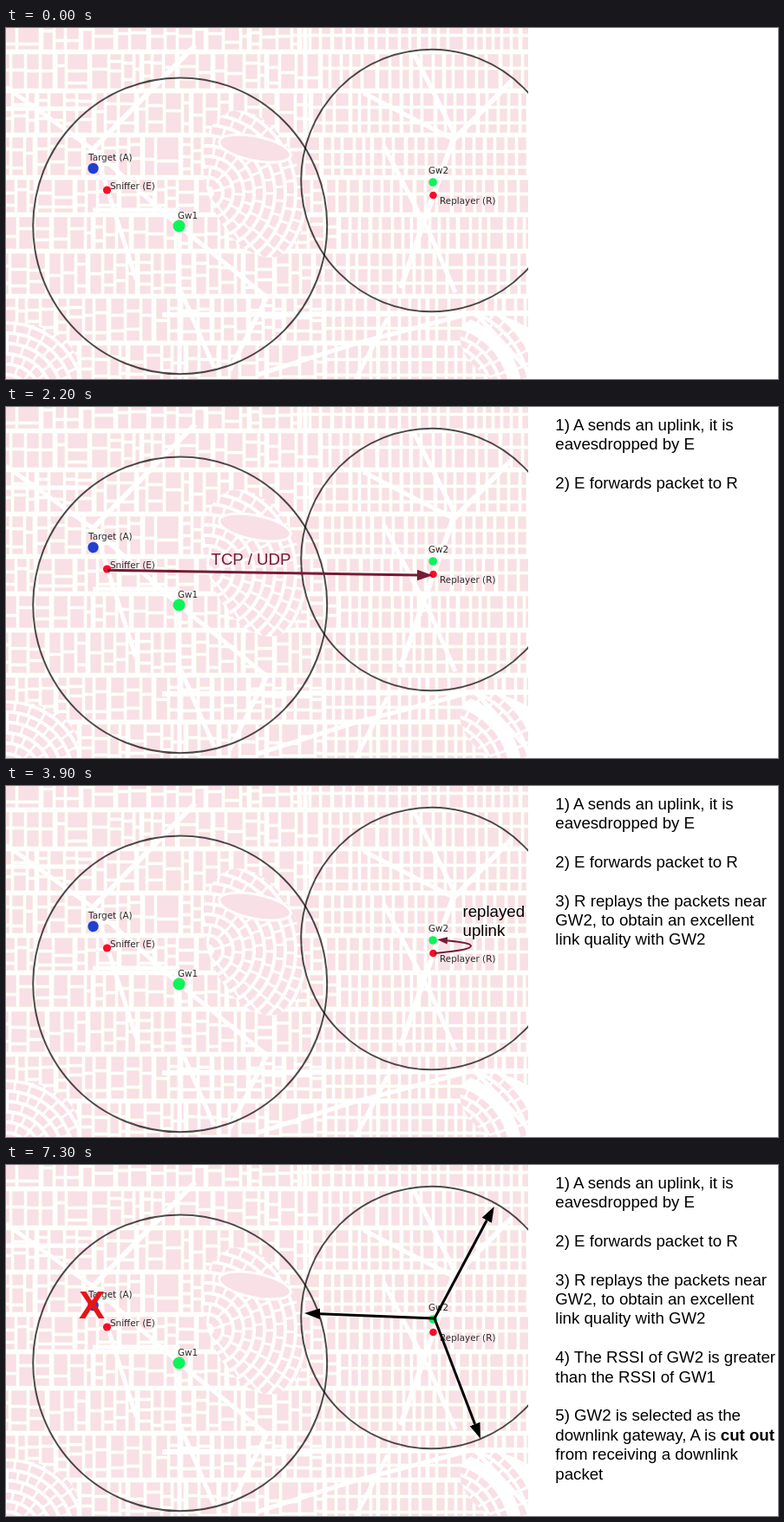
Recreate the animation shown at these times as an HTML page with a canvas. Size 890 by 405 pixels, loop 8000 ms.

```html
<!DOCTYPE html>
<html lang="en">
<head>
<meta charset="utf-8">
<title>Packet replay between gateways</title>
<style>
  html, body { margin: 0; width: 100%; height: 100%; overflow: hidden; background: #fff; }
  canvas, svg { position: absolute; left: 0; top: 0; }
  svg, #notes { font: 18.67px "Liberation Sans", Arial, sans-serif; }
  #notes { position: absolute; left: 633.3px; top: 9.6px; line-height: 22.4px; white-space: pre; }
  #notes p { margin: 0 0 22.4px; }
  [data-from], [data-at] { visibility: hidden; }
  .label { font: 10.4px "DejaVu Sans", sans-serif; fill: #2a2a2a; }
  .rssi { font-weight: bold; font-size: 24px; }
  .sub { font-size: 16px; }
  .line { fill: none; }
</style>
</head>
<body>
<canvas id="map" width="602" height="405"></canvas>
<svg width="890" height="405">
  <defs>
    <marker id="wine" orient="auto" markerWidth="6" markerHeight="5" refY="2.5">
      <path d="M0 .4L6 2.5L0 4.6z" fill="#741b35"/>
    </marker>
    <marker id="black" orient="auto" markerWidth="6" markerHeight="5" refY="2.5">
      <path d="M0 .4L6 2.5L0 4.6z"/>
    </marker>
    <clipPath id="edge"><path d="M0 0H602V405H0z"/></clipPath>
  </defs>

  <g fill="none" stroke="#000" stroke-opacity=".7" stroke-width="2" clip-path="url(#edge)">
    <ellipse cx="200.7" cy="228.3" rx="169.5" ry="170.9"/>
    <ellipse cx="490.5" cy="176" rx="150.3" ry="151.2"/>
  </g>
  <circle cx="100.5" cy="162" r="6.2" fill="#2040d0"/>
  <circle cx="199.5" cy="228.5" r="7" fill="#0cf558"/>
  <circle cx="492.2" cy="178" r="4.8" fill="#0cf558"/>
  <circle cx="116.5" cy="187" r="4.6" fill="#f80c28"/>
  <circle cx="492.5" cy="193" r="4.3" fill="#f80c28"/>
  <g class="label">
    <text x="95" y="153">Target (A)</text>
    <text x="120" y="186">Sniffer (E)</text>
    <text x="198" y="220">Gw1</text>
    <text x="487" y="168">Gw2</text>
    <text x="500" y="203">Replayer (R)</text>
  </g>

  <g data-at="1">
    <g class="line" stroke="#741b35" stroke-width="2.1">
      <path d="M101 162L108.5 174" marker-end="url(#wine)"/>
      <path d="M101 161.5L185 217" marker-end="url(#wine)"/>
    </g>
    <text x="102.5" y="214">uplink</text>
  </g>

  <g data-at="2">
    <path class="line" d="M117 188.3L474 194" stroke="#741b35" stroke-width="3" marker-end="url(#wine)"/>
    <text x="236.5" y="182" fill="#741b35">TCP / UDP</text>
  </g>

  <g data-at="3">
    <path class="line" d="M494 193C514 191 536 189 536 184.5C536 181 520 179.5 509 178.4" stroke="#741b35" stroke-width="2" marker-end="url(#wine)"/>
    <text x="526.5" y="151">replayed</text>
    <text x="526.5" y="173">uplink</text>
  </g>

  <g data-at="4" class="rssi">
    <g fill="#990000" stroke="#990000">
      <text x="159.8" y="263" stroke="none">RSSI<tspan class="sub" dy="6">1</tspan></text>
      <path class="line" d="M244.5 240V269M239.5 263L244.5 269L249.5 263" stroke-width="2"/>
    </g>
    <g fill="#38761d" stroke="#38761d">
      <text x="463.8" y="151" stroke="none">RSSI<tspan class="sub" dy="6">2</tspan></text>
      <path class="line" d="M546.5 157V131M541.5 137L546.5 131L551.5 137" stroke-width="2"/>
    </g>
    <text x="357.5" y="375">RSSI<tspan class="sub" dy="6">2</tspan><tspan dy="-6"> &gt; RSSI</tspan><tspan class="sub" dy="6">1</tspan></text>
  </g>

  <g data-at="5">
    <g class="line" stroke="#000" stroke-width="3">
      <path d="M494 177L554.3 63.8" marker-end="url(#black)"/>
      <path d="M494 177L362 171.7" marker-end="url(#black)"/>
      <path d="M494 177L540.6 299" marker-end="url(#black)"/>
    </g>
    <text x="84" y="177" font-size="45" font-weight="bold" fill="#e81414">X</text>
  </g>
</svg>

<div id="notes"><p data-from="1">1) A sends an uplink, it is
eavesdropped by E</p><p data-from="2">2) E forwards packet to R</p><p data-from="3">3) R replays the packets near
GW2, to obtain an excellent
link quality with GW2</p><p data-from="4">4) The RSSI of GW2 is greater
than the RSSI of GW1</p><p data-from="5">5) GW2 is selected as the
downlink gateway, A is <b>cut out</b>
from receiving a downlink
packet</p></div>

<script>
const ctx = document.getElementById('map').getContext('2d');
const PINK = '#f9dfe6', EDGE = '#f6eee2';
let seed = 41;
const rand = (lo = 0, hi = 1) => {
  seed = (seed * 16807) % 2147483647;
  return lo + (hi - lo) * seed / 2147483647;
};

function block(x, y, w, h) {
  ctx.fillStyle = EDGE;
  ctx.fillRect(x, y, w, h);
  ctx.fillStyle = PINK;
  ctx.fillRect(x + 1, y + 1, w - 2, h - 2);
}

// One district of blocks, each column cut at its own heights
function district(x, y, w, h) {
  const dense = x > 340;
  const rowHeight = dense ? 15 : rand(11, 19);
  for (let cx = x; cx < x + w - 4;) {
    const left = x + w - 3 - cx;
    let bw = Math.round(dense ? rand(7, 11) : rand(8, 19));
    if (left - bw < 8) bw = left;
    for (let cy = y; cy < y + h - 4;) {
      const below = y + h - 3 - cy;
      let bh = Math.round(dense ? rowHeight : rowHeight * rand(0.55, 1.5));
      if (below - bh < 8) bh = below;
      block(cx, cy, bw, bh);
      cy += bh + 3;
    }
    cx += bw + 3;
  }
}

function grid() {
  for (let y = -8; y < 405;) {
    const h = Math.round(rand(36, 56));
    for (let x = -6; x < 602;) {
      const w = Math.round(rand(34, 66));
      district(x, y, w, h);
      x += w + (x < 340 ? 2 : 1);
    }
    y += h + 2;
  }
}

// Curved blocks: dashed rings cut to an ellipse
function rings(cx, cy, rx, ry, turn, ox, oy, step) {
  ctx.save();
  ctx.beginPath();
  ctx.ellipse(cx, cy, rx, ry, turn, 0, 7);
  ctx.clip();
  ctx.fillStyle = '#fff';
  ctx.fillRect(0, 0, 602, 405);
  ctx.lineWidth = step - 4;
  ctx.strokeStyle = PINK;
  for (let r = step; r < 190; r += step) {
    ctx.setLineDash([rand(9, 15), 3]);
    ctx.beginPath();
    ctx.arc(ox, oy, r, rand(0, 1) - 4, 4);
    ctx.stroke();
  }
  ctx.restore();
}

function road(width, ...p) {
  ctx.lineWidth = width;
  ctx.strokeStyle = '#fff';
  ctx.beginPath();
  for (let i = 0; i < p.length; i += 2) ctx.lineTo(p[i], p[i + 1]);
  ctx.stroke();
}

grid();
rings(286, 180, 54, 88, -0.35, 232, 190, 12);
rings(575, 372, 55, 36, 0.5, 500, 425, 11);
rings(25, 380, 60, 38, 0.3, 0, 430, 12);
ctx.fillStyle = PINK;
ctx.strokeStyle = '#fff';
ctx.lineWidth = 3;
ctx.beginPath();
ctx.ellipse(287, 139, 42, 14, 0.2, 0, 7);
ctx.fill();
ctx.stroke();

road(6, 218, 20, 100, 140);
road(5, 0, 68, 100, 140, 199, 228, 300, 310);
road(5, 102, 140, 150, 290);
road(5, 198, 295, 240, 392);
road(5, 302, 308, 258, 395);
road(5, 468, 25, 520, 128);
road(5, 412, 75, 515, 128);
road(6, 582, 62, 515, 130, 455, 300);
road(5, 435, 135, 490, 240, 518, 305);
road(5, 440, 335, 403, 405);
road(5, 290, 400, 400, 365, 540, 328, 602, 395);
road(6, 180, 331, 602, 329);
road(5, 0, 93, 95, 93);
road(5, 100, 210, 200, 210);
road(5, 345, 0, 345, 125);
road(5, 200, 235, 200, 405);

const steps = [500, 2200, 3900, 5600, 7300];
const parts = [...document.querySelectorAll('[data-from], [data-at]')];

function draw(now) {
  const t = now % 8000;
  const phase = steps.filter(s => t >= s).length;
  for (const el of parts) {
    const { from, at } = el.dataset;
    const on = from ? phase >= from : phase == at;
    el.style.visibility = on ? 'visible' : 'hidden';
  }
}

const start = performance.now();
(function tick() {
  draw(performance.now() - start);
  requestAnimationFrame(tick);
})();
</script>
</body>
</html>
```
